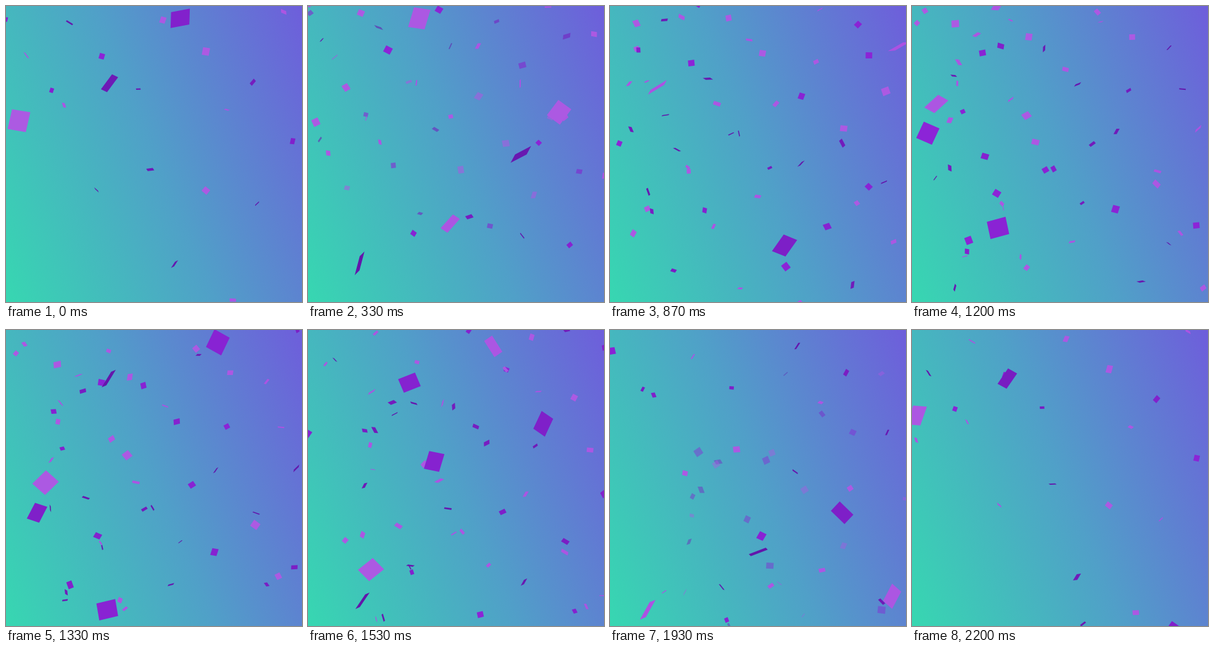
An HTML page with a canvas for the animation above (2270 ms loop, 480 px wide and 480 px high).

```html
<!DOCTYPE html>
<html lang="en">
<head>
<meta charset="utf-8">
<title>Confetti</title>
<style>
  html, body { margin: 0; height: 100%; overflow: hidden; }
  body { background: linear-gradient(68deg, #37d7b1, #50a0c8 50%, #6e5edb); }
  canvas { display: block; width: 100vw; height: 100vh; }
</style>
</head>
<body>
<canvas id="stage" width="480" height="480"></canvas>
<script>
const ctx = document.getElementById('stage').getContext('2d');
const LOOP = 2.27;
const GOLDEN = .618034;

let seed = 4711;
function rnd(min, max) {
  seed = (seed * 16807) % 2147483647;
  return min + (max - min) * seed / 2147483647;
}

const ramp = (v, from, to) => Math.max(0, Math.min(1, (v - from) / (to - from)));

// A piece is at x, y when time is start; speeds are in pixels per second.
function piece(x, y, start, vx, vy, size) {
  return {
    x, y, start, vx, vy, size,
    angle: rnd(-1.3, 1.3), spin: rnd(-1, 1), skew: rnd(-.5, .5),
    flip: rnd(0, 2 * Math.PI), flipRate: rnd(3.5, 6)
  };
}

// Pieces spread evenly over an area, drifting less on the right, faster lower down.
function wave(count, start, place) {
  return Array.from({ length: count }, (_, i) => {
    const [x, y] = place((i * GOLDEN) % 1, (i + .5) / count);
    const depth = rnd(.8, 1.2);
    const vx = (82 - .09 * x) * depth;
    const vy = (100 + .42 * Math.max(y, 0)) * depth;
    return piece(x, y, start, vx, vy, rnd(8.5, 11) * depth);
  });
}

const confetti = [
  ...wave(28, .6, (u, v) => [480 * u - 20, 500 * v - 60]),
  ...wave(30, LOOP, (u, v) => {
    const x = 520 * u ** 1.8 - 50;
    return [x, 390 * v - 180 - .2 * x];
  })
];

// Near pieces: x and time at which each crosses the middle of the stage.
const closeUps = [
  [36, .08], [200, .17], [345, .33], [426, .43], [243, .66], [107, 1.03], [518, 1.13],
  [35, 1.25], [62, 1.32], [212, 1.57], [4, 1.63], [406, 1.66], [208, 1.76], [361, 1.85]
].map(([x, start]) => piece(x, 240, start, 190, 690, rnd(29, 34)));

function drawPiece(p, time, alpha) {
  const t = time - p.start;
  const gravity = .62 * p.vx + 12;
  const x = p.x + p.vx * t;
  const y = p.y + p.vy * t + gravity * t * t / 2;
  if (alpha <= 0 || x < -40 || x > 520 || y < -40 || y > 520) return;

  const face = Math.cos(p.flip + p.flipRate * t);
  const light = face * face;
  ctx.save();
  ctx.globalAlpha = alpha;
  ctx.translate(x, y);
  ctx.rotate(p.angle + p.spin * t);
  ctx.scale(1, .14 + .8 * light);
  ctx.rotate(p.skew);
  ctx.fillStyle = face > 0
    ? `rgb(172, ${82 + 8 * light}, 226)`
    : `rgb(${98 + 42 * light}, ${22 + 14 * light}, ${170 + 45 * light})`;
  ctx.fillRect(-p.size / 2, -p.size / 2, p.size, p.size);
  ctx.restore();
}

function render(t) {
  ctx.clearRect(0, 0, 480, 480);
  // Two overlapping runs of the same shower hide the seam.
  for (const time of [t, t + LOOP]) {
    const alpha = ramp(time, .1, .5) * (1 - ramp(time, 4.02, 4.34));
    for (const p of confetti) drawPiece(p, time, alpha);
  }
  for (const time of [t - LOOP, t, t + LOOP])
    for (const p of closeUps) drawPiece(p, time, 1);
}

const begin = performance.now();
function tick() {
  render((performance.now() - begin) / 1000 % LOOP);
  requestAnimationFrame(tick);
}
tick();
</script>
</body>
</html>
```
